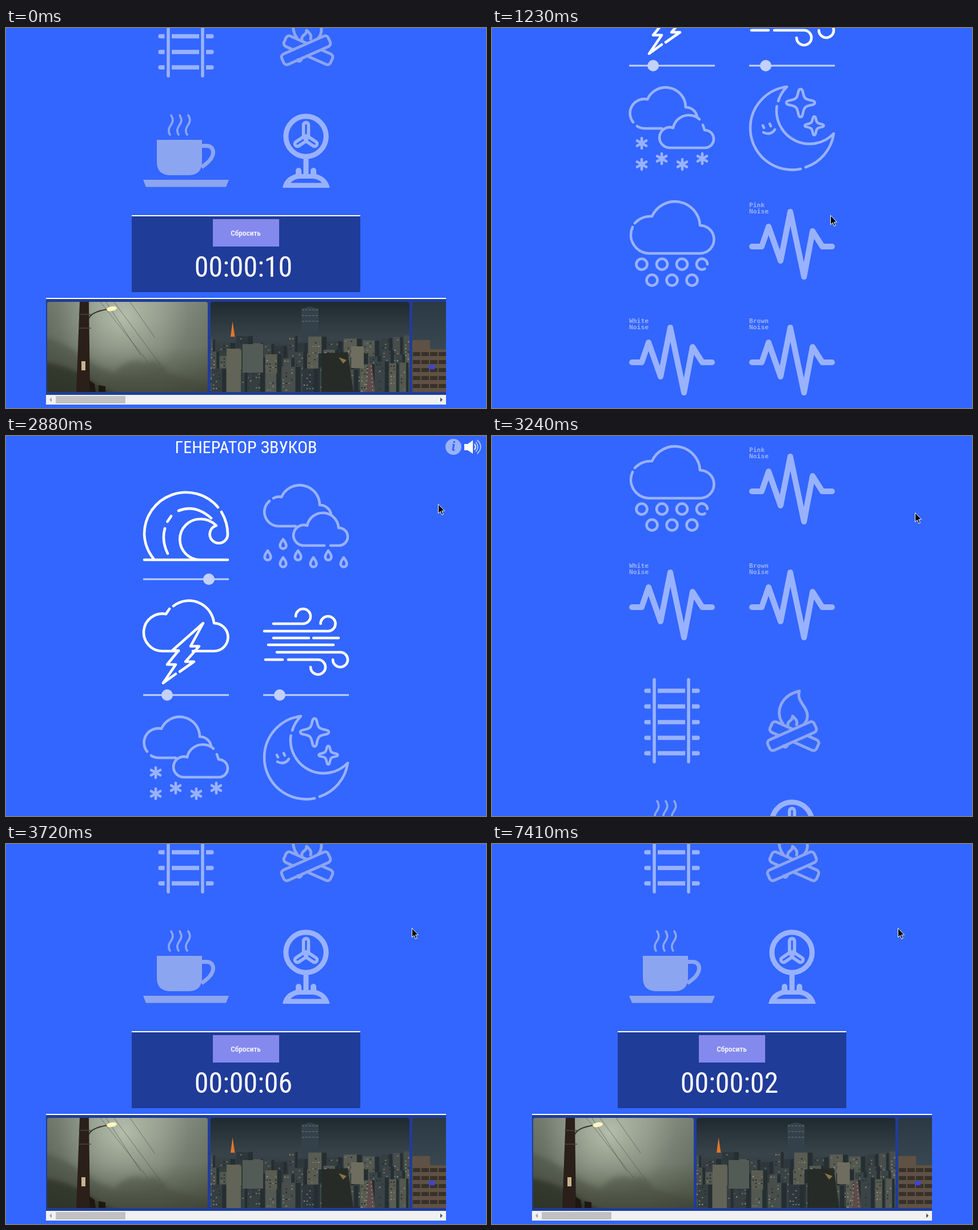
Recreate the animation shown at these times as an HTML page. Size 840 px wide and 666 px high, loop 8 s.

```html
<!DOCTYPE html>
<html lang="ru">
<head>
<meta charset="utf-8">
<title>Генератор звуков</title>
<style>
  html, body { margin: 0; width: 100%; height: 100%; overflow: hidden; background: #36f; }
  svg { display: block; width: 100%; height: 100%; }
  text { font-family: "Roboto Condensed", Roboto, sans-serif; font-stretch: 75%; fill: #fff; }
  .line { fill: none; stroke-width: 4.6; stroke-linecap: round; stroke-linejoin: round; }
  .on { stroke: #fff; }
  .off { stroke: #99b2ff; }
  .pale { fill: #99b2ff; }
  .grey { fill: #8ca5f0; }
  .mono { font: bold 11.3px "DejaVu Sans Mono", monospace; fill: #99b2ff; }
</style>
</head>
<body>
<svg viewBox="0 0 840 666" xmlns="http://www.w3.org/2000/svg">
  <defs>
    <linearGradient id="fog" x1="0" y1="0" x2="0" y2="1">
      <stop offset="0" stop-color="#8f9a8b"/><stop offset=".5" stop-color="#7d8677"/><stop offset="1" stop-color="#4b5141"/>
    </linearGradient>
    <radialGradient id="glow" gradientUnits="userSpaceOnUse" cx="205" cy="505" r="115">
      <stop offset="0" stop-color="#c3ccb8" stop-opacity=".75"/><stop offset="1" stop-color="#a4ad9c" stop-opacity="0"/>
    </radialGradient>
    <linearGradient id="shade" x1="0" y1="0" x2="1" y2="0">
      <stop offset="0" stop-color="#1e241c" stop-opacity=".3"/><stop offset=".35" stop-color="#1e241c" stop-opacity="0"/>
      <stop offset=".7" stop-color="#1e241c" stop-opacity="0"/><stop offset="1" stop-color="#1e241c" stop-opacity=".22"/>
    </linearGradient>
    <linearGradient id="night" x1="0" y1="0" x2="0" y2="1">
      <stop offset="0" stop-color="#1e2930"/><stop offset=".4" stop-color="#39434a"/><stop offset="1" stop-color="#1d2529"/>
    </linearGradient>
    <linearGradient id="dusk" x1="0" y1="0" x2="0" y2="1">
      <stop offset="0" stop-color="#2b3944"/><stop offset="1" stop-color="#46545e"/>
    </linearGradient>
    <filter id="soft" x="-10%" y="-20%" width="120%" height="140%"><feGaussianBlur stdDeviation="4"/></filter>
    <clipPath id="photo1"><rect x="72" y="480" width="281" height="158" rx="4"/></clipPath>
    <clipPath id="photo2"><rect x="358" y="480" width="348" height="158" rx="4"/></clipPath>
    <clipPath id="photo3"><path d="M770 480H715a4 4 0 0 0-4 4V634a4 4 0 0 0 4 4H770Z"/></clipPath>
    <path id="pulse" d="M5 79H22L34 44L55 104L72 18L96 132L111 52L128 79H145"/>
    <path id="drop" d="M0-8C3-4 5.4-1 5.4 3A5.4 5.4 0 0 1-5.4 3C-5.4-1-3-4 0-8Z"/>
    <path id="flake" d="M0-9V9M-8-4.6L8 4.6M-8 4.6L8-4.6"/>
    <path id="star" d="M0-24Q3-24 4-19C6-8 8-6 19-4Q25-3 25 0Q25 3 19 4C8 6 6 8 4 19Q3 25 0 25Q-3 25-4 19C-6 8-8 6-19 4Q-25 3-25 0Q-25-3-19-4C-8-6-6-8-4-19Q-3-24 0-24Z"/>
  </defs>
  <rect width="840" height="666" fill="#36f"/>
  <g id="page">
    <!-- header -->
    <text x="420" y="59" font-size="30" text-anchor="middle">ГЕНЕРАТОР ЗВУКОВ</text>
    <circle class="pale" cx="783" cy="48" r="14"/>
    <text x="783" y="55" text-anchor="middle" style="font:italic bold 21px 'Noto Serif',serif;fill:#36f">i</text>
    <path d="M802 43H808L817 36.5V60L808 54H802Z" fill="#fff"/>
    <g class="line" style="stroke-width:1.8">
      <path d="M820 43.5Q823.5 48 820 52.5" stroke="#fff"/>
      <path d="M822.5 40Q829 48 822.5 56M825 36.5Q836.5 48 825 59.5" stroke="#b3c6ff"/>
    </g>

    <!-- wave, thunder, wind -->
    <g class="line on">
      <path d="M242 246H388M259 245A73 73 0 0 1 242 201A73 73 0 0 1 371 154M377 162Q388 181 388 201A15.7 15.7 0 1 1 368 186Q356 174 340 174.5A35.7 35.7 0 0 0 340 246M302 160Q331 148 359 173M289 169.5L282.5 179M278 191Q272 213 283 235"/>
      <path d="M302 406H274A32.8 32.8 0 1 1 280 341L286 332M293 327A44 44 0 0 1 364 357A24.5 24.5 0 0 1 364 406H327"/>
      <path d="M304 442L329 424.5H314L338 397.5H323L345 357L291 405H302L282 429.5H297L275 462L297 446"/>
      <path d="M468 358H520A13 13 0 1 0 507 345M452 371H564A13 13 0 1 0 550.5 358M468 383H530M538 383H582M459 395H573M474 408H585A13 13 0 1 1 572 421M454 421H484M494 421H546A13 13 0 1 1 533 434"/>
    </g>

    <!-- rain, snow, moon, hail -->
    <g class="line off">
      <path d="M507 187H478A25 25 0 0 1 461 143M468 138Q475 134 482 136A35 35 0 0 1 549 150A20 20 0 0 1 569 167M568 221H583A15.5 15.5 0 0 0 582 190A27.8 27.8 0 0 0 527 186A18 18 0 1 0 521 221H557"/>
      <g id="drops"></g>
      <g transform="translate(-210 406)">
        <path d="M507 187H478Q469 187 464 183M457 176A25 25 0 0 1 482 136A35 35 0 0 1 549 150A20 20 0 0 1 569 167M579 181Q581 186 582 190A15.5 15.5 0 0 1 583 221H521A18 18 0 1 1 527 186A27.8 27.8 0 0 1 573 171"/>
      </g>
      <g id="flakes"></g>
      <path d="M501 545Q505 531 516 520A73 73 0 0 0 452 592A73 73 0 0 0 540 664M549 661A73 73 0 0 0 598 602A58 58 0 0 1 498.5 554"/>
      <use href="#star" transform="translate(540 548)"/>
      <use href="#star" transform="translate(564 588) scale(.66)" style="stroke-width:6.8"/>
      <path d="M474 588L476 592M486 585L488 589M475 600Q488 606 495 595"/>
      <g transform="translate(0 406)">
        <path d="M250 353Q262 340 280 341A44 44 0 0 1 364 357A24.5 24.5 0 0 1 364 406H274A32.5 32.5 0 0 1 246 360"/>
      </g>
      <g id="hail"></g>
      <g style="stroke-width:10">
        <use href="#pulse" x="450" y="721"/>
        <use href="#pulse" x="240" y="924"/>
        <use href="#pulse" x="450" y="924"/>
      </g>
    </g>
    <g id="labels"></g>
    <g id="sliders" fill="#c2d1ff"></g>

    <!-- railway and campfire -->
    <g transform="translate(0 703)">
      <path class="line off" style="stroke-width:5.5" d="M284 427V571M344 427V571"/>
      <g id="sleepers" class="pale"></g>
      <g class="line" stroke="#8ca5f0" style="stroke-width:5">
        <path d="M509 504C494 484 506 454 538 447C532 465 552 474 552 490Q552 498 547 504M518 508C516 498 526 501 526 491Q536 499 533 506"/>
        <rect x="-44.5" y="-10" width="89" height="20" rx="6" transform="translate(529 526) rotate(24)" fill="#36f"/>
        <rect x="-44.5" y="-10" width="89" height="20" rx="6" transform="translate(525 526) rotate(-24)" fill="#36f"/>
        <path d="M510 543Q514 549 518 540"/>
      </g>
    </g>

    <!-- cup and fan -->
    <g transform="translate(0 1096)">
      <path class="grey" d="M264 290H343V328Q343 352 319 352H288Q264 352 264 328ZM240 360H390L385 372.5H245Z"/>
      <path d="M342 300.5H351C359 300.5 363 306 362.5 313C361 324 352 331 342 338" fill="none" stroke="#8ca5f0" stroke-width="7"/>
      <g id="steam" class="line" stroke="#8ca5f0" style="stroke-width:3.6"></g>
      <circle cx="525" cy="284" r="35.2" fill="none" stroke="#99b2ff" stroke-width="9"/>
      <g id="blades" class="line"></g>
      <path class="pale" d="M520.5 322H529.5V350H533V344A4.5 4.5 0 0 1 543 344V350Q563 356 566.5 374H484Q487 356 507 350V344A4.5 4.5 0 0 1 517 344V350H520.5Z"/>
      <path d="M498 365.5Q504 358.5 514 358H537Q547 358.5 553 365.5Z" fill="#36f"/>
    </g>

    <!-- timer and photo strip -->
    <g transform="translate(0 1190)">
      <rect x="220" y="328" width="400" height="135" fill="#203c99"/>
      <rect x="220" y="328" width="400" height="2" fill="#fff"/>
      <rect x="362" y="335" width="116" height="48" fill="#8489ee"/>
      <text x="419.5" y="364" font-size="13.33" font-weight="500" text-anchor="middle">Сбросить</text>
      <text id="clock" x="415.5" y="436" font-size="50" text-anchor="middle"></text>
      <rect x="70" y="473" width="700" height="170" fill="#203c99"/>
      <rect x="70" y="473" width="700" height="2" fill="#fff"/>
      <g clip-path="url(#photo1)">
        <rect x="72" y="480" width="281" height="158" fill="url(#fog)"/>
        <rect x="72" y="480" width="281" height="158" fill="url(#shade)"/>
        <rect x="72" y="480" width="281" height="158" fill="url(#glow)"/>
        <g filter="url(#soft)">
          <path d="M62 540Q105 552 128 572T190 604Q215 574 245 586Q270 576 282 604Q320 614 363 632V648H62Z" fill="#3f4637" opacity=".4"/>
          <path d="M62 585Q110 590 150 618T220 648H62Z" fill="#23281e" opacity=".55"/>
        </g>
        <path d="M165 480L248 585M175 480L236 574M189 480L270 590M217 480L260 542" fill="none" stroke="#474b40" opacity=".6"/>
        <path d="M129 480H145L147 638H123Z" fill="#2a1f19"/>
        <path d="M145 509Q150 497 178 493" fill="none" stroke="#343129" stroke-width="2"/>
        <path d="M127 502H149M127 526H149" stroke="#4a463c" stroke-width="1.5"/>
        <ellipse cx="185" cy="492" rx="9" ry="4" fill="#fff5c3" transform="rotate(-10 185 492)"/>
        <rect x="132" y="584" width="7" height="16" fill="#c8b48d"/>
        <path d="M146 638V618L155 624L157 638M162 638V626L174 628V638" fill="#20170f"/>
      </g>
      <g clip-path="url(#photo2)">
        <rect x="358" y="480" width="348" height="158" fill="url(#night)"/>
        <path d="M396.5 514L393 541H400.5Z" fill="#dd782a"/>
        <path d="M517 492L532 488L547 492V560H517Z" fill="#34414a"/>
        <path d="M518 494H546M518 504H546M518 514H546" stroke="#6d7b78" stroke-dasharray="4 2"/>
        <g id="city"></g>
        <path d="M386 562H411V638H386Z" fill="#626457"/>
        <path d="M414 554H450V604H414Z" fill="#535b57"/>
        <path d="M604 558H626V596H604Z" fill="#6f6d5f"/>
        <path d="M630 638L634 588H640L646 638Z" fill="#5c4c4a"/>
        <path d="M633 596L630 638M639 592L642 638" stroke="#b99488" stroke-width="1.5" stroke-dasharray="2 5"/>
        <path d="M552 570L598 568L608 638H552Z" fill="#272b28"/>
        <path d="M582 577L596 582L590 588Z" fill="#8a7440"/>
      </g>
      <g clip-path="url(#photo3)">
        <rect x="711" y="480" width="59" height="158" fill="url(#dusk)"/>
        <path d="M711 547H742V563H770V638H711Z" fill="#5f5244"/>
        <path id="floors" fill="#37312a"/>
        <rect x="740" y="591" width="10" height="7" fill="#3b42e8"/>
      </g>
      <rect x="70" y="643" width="700" height="17" fill="#f1f1f1"/>
      <rect x="87" y="645" width="122" height="13" fill="#c1c1c1"/>
      <path d="M80 647.5V655.5L76 651.5Z" fill="#a3a3a3"/>
      <path d="M760 647.5V655.5L764 651.5Z" fill="#505050"/>
    </g>
  </g>
  <path id="cursor" d="M.5 .5V16.5L4.2 13.2L6.8 19.3L9.3 18.2L6.7 12.2H11.5Z" fill="#000" stroke="#fff"/>
</svg>
<script>
const $ = id => document.getElementById(id);
const fill = (id, items, draw) => { $(id).innerHTML = items.map(draw).join(""); };
const use = name => ([x, y]) => `<use href="#${name}" x="${x}" y="${y}"/>`;
const rect = (x, y, w, h, color) => `<rect x="${x}" y="${y}" width="${w}" height="${h}" fill="${color}"/>`;

fill("drops", [[485, 218], [458, 238], [511, 238], [564, 238], [485, 250], [538, 250], [591, 250]], use("drop"));
fill("flakes", [[262, 619], [262, 656], [297, 646], [333, 656], [368, 646]], use("flake"));
fill("hail", [[262, 831], [297.5, 831], [332.5, 831], [367.5, 831], [280, 859], [315, 859], [350, 859]], ([x, y], i) =>
  i === 3 ? `<path d="M${x + 9.5} ${y}A9.5 9.5 0 1 0 ${x + 5} ${y + 8}"/>`
          : `<circle cx="${x}" cy="${y}" r="9.5"/>`);
fill("labels", [["Pink", 450, 731], ["White", 240, 934], ["Brown", 450, 934]], ([name, x, y]) =>
  `<text class="mono" x="${x}" y="${y}">${name}</text><text class="mono" x="${x}" y="${y + 11}">Noise</text>`);
fill("sliders", [[240, 280, 115], [240, 483, 42], [450, 483, 29]], ([x, y, value]) =>
  `<rect x="${x}" y="${y - 1.5}" width="150" height="3"/><circle cx="${x + value}" cy="${y}" r="10"/>`);
fill("sleepers", [446.5, 474, 501.5, 529, 556], y =>
  `<path d="M277.5 ${y - 3.7}H270a3.7 3.7 0 0 0 0 7.4H277.5ZM290 ${y - 3.7}H338v7.4H290ZM350 ${y - 3.7}H360a3.7 3.7 0 0 1 0 7.4H350Z"/>`);
fill("steam", [289, 304, 319], x =>
  `<path d="M${x} 247c5 8 2.500 13-1 18s-5 10-1 16"/>`);

const spokes = [[525, 264], [510, 297], [540, 297]];
const spoke = (from, color, width) => ([x, y]) => {
  const sx = 525 + (x - 525) * from, sy = 287 + (y - 287) * from;
  return `<path d="M${sx} ${sy}L${x} ${y}" stroke="${color}" style="stroke-width:${width}"/>`;
};
$("blades").innerHTML = spokes.map(spoke(0, "#99b2ff", 14.5)).join("") + spokes.map(spoke(0.35, "#36f", 3.2)).join("");

function drawCity() {
  let seed = 11;
  const rnd = () => (seed = seed * 16807 % 2147483647) / 2147483647;
  const pick = list => list[Math.floor(rnd() * list.length)];
  const walls = ["#3a4345", "#474e4b", "#535850", "#2e383c", "#5a5c52", "#353e40"];
  const lights = ["#8f9080", "#6d7977", "#252d30", "#22292c", "#7e7a62"];
  let out = "";
  for (let row = 0; row < 3; row++) {
    for (let x = 352 + row * 4; x < 706;) {
      const w = 14 + rnd() * 20, top = 536 + row * 24 + rnd() * 22;
      out += rect(x, top, w, 640 - top, pick(walls));
      out += rect(x + w * 0.72, top, w * 0.28, 640 - top, "#252e31");
      for (let y = top + 4; y < 636; y += 6)
        for (let wx = x + 2; wx < x + w * 0.65; wx += 5)
          if (rnd() < 0.4) out += rect(wx, y, 2.5, 2, pick(lights));
      x += w + rnd() * 3;
    }
  }
  $("city").innerHTML = out;
}
drawCity();

let floors = "";
for (let y = 568; y < 638; y += 14)
  for (let x = 712; x < 770; x += 15) floors += `M${x} ${y}h13v7h-13Z`;
$("floors").setAttribute("d", floors);

// Smooth curve through keys [time, value...], without overshoot.
function curve(keys, col, t) {
  const last = keys.length - 1;
  if (t <= keys[0][0]) return keys[0][col];
  if (t >= keys[last][0]) return keys[last][col];
  const slope = i => (keys[i + 1][col] - keys[i][col]) / (keys[i + 1][0] - keys[i][0]);
  const tangent = i => {
    if (i === 0 || i === last) return 0;
    const a = slope(i - 1), b = slope(i);
    return a * b <= 0 ? 0 : 2 * a * b / (a + b);
  };
  const i = keys.findIndex(k => k[0] > t) - 1;
  const h = keys[i + 1][0] - keys[i][0], u = (t - keys[i][0]) / h, v = 1 - u;
  return keys[i][col] * v * v * (1 + 2 * u) + tangent(i) * h * u * v * v
       + keys[i + 1][col] * u * u * (3 - 2 * u) - tangent(i + 1) * h * u * u * v;
}

const scrollKeys = [[939, 1190], [990, 1162], [1410, 0], [2820, 0], [3240, 703], [3600, 1096], [3720, 1190]];
const cursorKeys = [
  [60, 838, 52], [510, 577, 353], [630, 577, 353], [720, 585, 349], [990, 585, 349],
  [1410, 596, 314], [1530, 596, 314], [1770, 668, 193], [2100, 762, 107], [2250, 762, 107],
  [2370, 754, 119], [2490, 754, 119], [2610, 757, 118], [2820, 757, 118], [3240, 740, 134], [3600, 710, 147]
];
const LOOP = 8000, STEP = 30, TICK = 960, FIRST_TICK = 690;

function render(now) {
  const t = Math.floor(now % LOOP / STEP) * STEP;
  const left = 10 - Math.max(0, Math.floor((t - FIRST_TICK) / TICK) + 1);
  $("page").setAttribute("transform", `translate(0 ${-Math.round(curve(scrollKeys, 1, t))})`);
  $("clock").textContent = "00:00:" + String(left).padStart(2, "0");
  const x = Math.round(curve(cursorKeys, 1, t)), y = Math.round(curve(cursorKeys, 2, t));
  $("cursor").setAttribute("transform", `translate(${x} ${y})`);
  $("cursor").setAttribute("visibility", t < 90 ? "hidden" : "visible");
}

const start = performance.now();
function frame() {
  render(performance.now() - start);
  requestAnimationFrame(frame);
}
frame();
</script>
</body>
</html>
```
